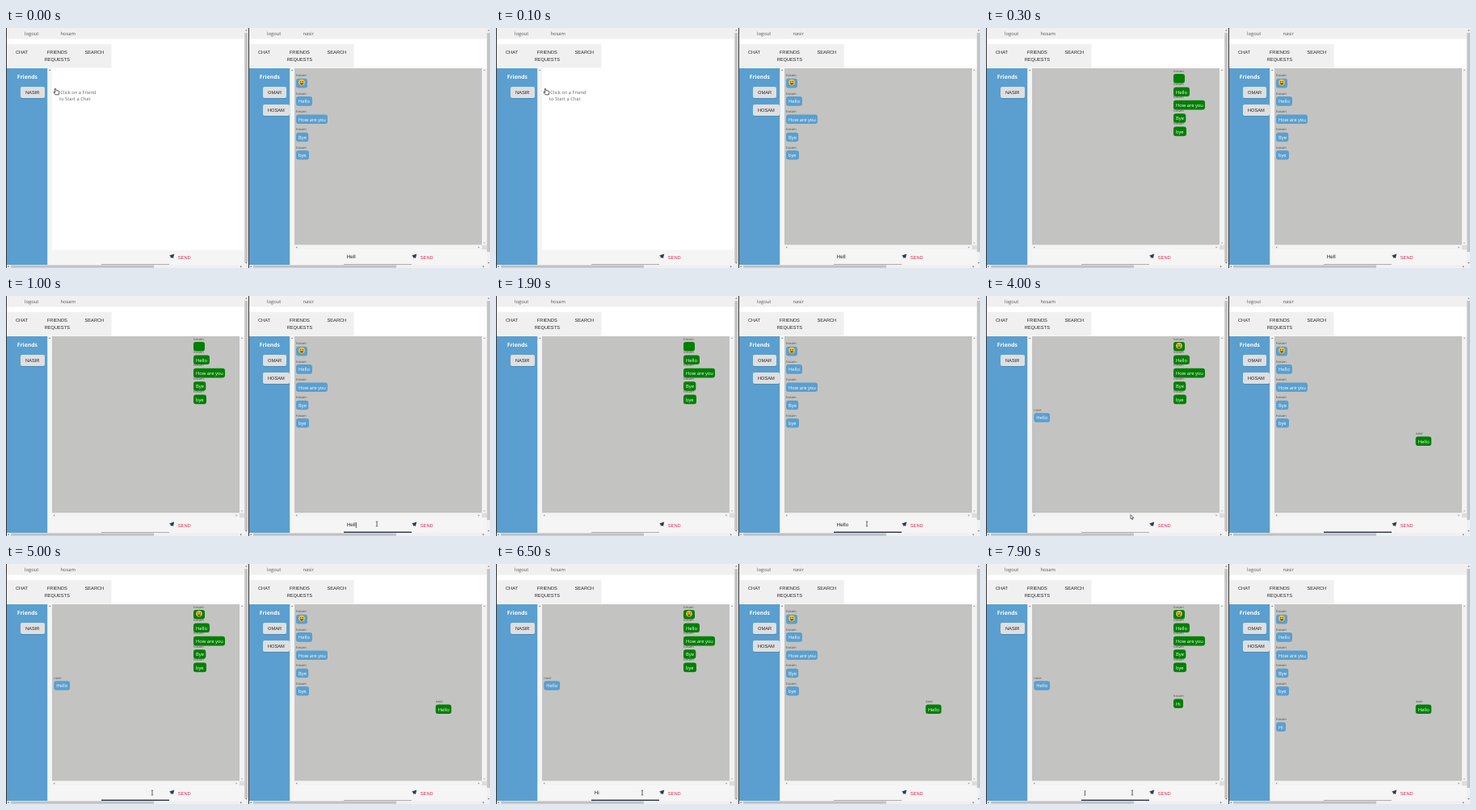
These frames come from a looping animation (599x298 px, 8000 ms). An HTML page:

```html
<!DOCTYPE html>
<html lang="en">
<head>
<meta charset="utf-8">
<title>Two chat windows</title>
<style>
html, body { margin: 0; width: 100%; height: 100%; overflow: hidden; background: #fff; }
svg { display: block; width: 599px; height: 298px; }
text { text-rendering: geometricPrecision; white-space: pre; }
.soft { font-family: "Open Sans", "Noto Sans", sans-serif; font-size: 5.8px; }
.caps { font-family: "Liberation Sans", Arial, sans-serif; font-size: 5.7px; }
</style>
</head>
<body>
<svg id="stage" viewBox="0 0 599 298" xmlns="http://www.w3.org/2000/svg"></svg>
<script>
const LOOP = 8000;
const NS = "http://www.w3.org/2000/svg";
const BLUE = "#5a9fcf", GREEN = "#007f00", GREY = "#c3c4c1", PALE = "#f0f0f0", INK = "#263247";
const stage = document.getElementById("stage");

function add(parent, tag, attrs, content) {
  const node = document.createElementNS(NS, tag);
  for (const key in attrs) node.setAttribute(key, attrs[key]);
  if (content !== undefined) node.textContent = content;
  parent.appendChild(node);
  return node;
}
const group = (parent, attrs = {}) => add(parent, "g", attrs);
const box = (parent, x, y, width, height, fill, rx = 0) =>
  add(parent, "rect", { x, y, width, height, fill, rx });
const path = (parent, d, fill, extra = {}) => add(parent, "path", { d, fill, ...extra });
const soft = (parent, x, y, str, fill, extra = {}) =>
  add(parent, "text", { x, y, fill, class: "soft", ...extra }, str);
const caps = (parent, x, y, str, fill = "#222", extra = {}) =>
  add(parent, "text", { x, y, fill, class: "caps", ...extra }, str);
const show = (node, on) => node.setAttribute("visibility", on ? "inherit" : "hidden");

function button(parent, y, label, width) {
  box(parent, 18, y + 1, width, 14, "#35699065", 2);
  box(parent, 18, y, width, 14, "#dfdfdf", 2);
  caps(parent, 24, y + 9.2, label);
}

function smiley(parent, x, y) {
  const g = group(parent, { transform: `translate(${x} ${y})` });
  add(g, "circle", { r: 3.8, fill: "#f5c33b" });
  add(g, "ellipse", { cx: -1.3, cy: -1, rx: 0.6, ry: 0.95, fill: "#50381c" });
  add(g, "ellipse", { cx: 1.3, cy: -1, rx: 0.6, ry: 0.95, fill: "#50381c" });
  path(g, "M-2.3 .7Q0 1.3 2.3 .7Q1.8 3 0 3Q-1.8 3-2.3 .7Z", "#6b3c1c");
  return g;
}

// A message: sender above a rounded bubble whose top is y.
function message(parent, x, y, who, str, width, color) {
  const g = group(parent);
  soft(g, x, y - 2.4, who, "#4a4a4a", { style: "font-size:4px" });
  box(g, x, y, width, 11.6, color, 3);
  soft(g, x + 3, y + 8.1, str, "#fff");
  return g;
}

const HISTORY = [["", 14], ["Hello", 20], ["How are you", 39], ["Bye", 15.3], ["bye", 16]];

function thread(parent, x, y, step, color) {
  HISTORY.forEach(([str, width], i) => message(parent, x, y + i * step, "hosam", str, width, color));
}

function chatArea(parent) {
  const g = group(parent);
  box(g, 57, 50, 232, 219.5, GREY);
  box(g, 57, 269.5, 232, 6, "#f3f3f3");
  box(g, 289, 50, 6, 219.5, "#f3f3f3");
  box(g, 289, 269.5, 6, 6, "#dcdcdc");
  path(g, "M60.2 271.2v2.4l-1.4-1.2zM284.6 271.2v2.4l1.4-1.2z", "#777");
  path(g, "M290.8 53h2.4l-1.2-1.4zM290.8 266.4h2.4l-1.2 1.4z", "#999");
  return g;
}

function windowPane(x, user, friends, thumb) {
  const g = group(stage, { transform: `translate(${x} 0)` });
  box(g, 0, 0, 300, 298, "#fff");
  box(g, 0, 0, 295, 13.5, PALE);
  soft(g, 23, 9.4, "logout", "#555");
  soft(g, 67.5, 9.4, user, "#555");
  box(g, 1, 20, 129.5, 29.5, PALE);
  caps(g, 12, 32, "CHAT");
  caps(g, 63.3, 32, "FRIENDS", "#222", { "text-anchor": "middle" });
  caps(g, 63.3, 41.2, "REQUESTS", "#222", { "text-anchor": "middle" });
  caps(g, 97.5, 32, "SEARCH");

  const chat = group(g);
  box(g, 1, 50, 50.5, 244, BLUE);
  soft(g, 13.8, 63, "Friends", "#fff", { style: "font-size:6.8px;font-weight:700" });
  friends.forEach(([label, width], i) => button(g, 73 + i * 22, label, width));
  box(g, 51.5, 50, 5.5, 244, "#f4f4f4");
  path(g, "M53 53h2.4l-1.2-1.4z", "#777");

  box(g, 57, 275.5, 238, 18.5, "#f5f5f5");
  const text = caps(g, 121.8, 286.4, "", "#222", { style: "font-size:6.3px" });
  const caret = box(g, 122, 281, 0.7, 7, "#222");
  box(g, 118, 293, 84, 0.8, "#9b9b9b");
  const line = box(g, 118, 292.6, 84, 1.5, INK);
  path(g, "M202.2 282.6l6-2.2-1.3 5.6-1.9-1.2-1 1.4-.2-2.2z", "#2c3a4c");
  caps(g, 212.8, 287, "SEND", "#e0284f");

  box(g, 295, 0, 5, 298, PALE);
  box(g, 295.3, 6, 4, thumb, "#c4c4c4");
  path(g, "M296 3.6h2.6l-1.3-1.6zM296 291h2.6l-1.3 1.6z", "#777");
  box(g, 0, 294, 295, 4, PALE);
  box(g, 6, 294.5, 177, 3.2, "#c1c1c1");
  path(g, "M3.6 295v2.4l-1.5-1.2zM290.2 295v2.4l1.5-1.2z", "#666");
  box(g, 0, 0, 0.9, 298, "#222");
  return { chat, text, caret, line };
}

const left = windowPane(0, "hosam", [["NASIR", 30]], 285);
const right = windowPane(300, "nasir", [["OMAR", 29], ["HOSAM", 33]], 272);

const hint = group(left.chat);
soft(hint, 67.3, 82, "Click on a Friend", "#666");
soft(hint, 66, 90.3, "to Start a Chat", "#666");

const leftChat = chatArea(left.chat);
thread(leftChat, 232, 57, 16.4, GREEN);
const lateSmiley = smiley(leftChat, 239, 61.8);
const leftHello = message(leftChat, 59.3, 145.2, "nasir", "Hello", 19.8, BLUE);
const leftHi = message(leftChat, 232, 167.5, "hosam", "Hi", 12, GREEN);

const rightChat = chatArea(right.chat);
thread(rightChat, 59, 62.8, 22.3, BLUE);
smiley(rightChat, 66, 67.6);
const rightHello = message(rightChat, 231.7, 174.5, "nasir", "Hello", 19.5, GREEN);
const rightHi = message(rightChat, 59, 196.5, "hosam", "Hi", 12, BLUE);

const outline = { stroke: "#111", "stroke-width": 0.7, "stroke-linejoin": "round" };
const pointers = {
  hand: path(stage, "M-1.6-3.5q.9-.8 1.4.2l.4 2 2.7.3q1.2.3 1 1.6l-.6 3.2h-4.2l-2-2.6q-.5-1.2.8-.8l1 .8z", "#fff", outline),
  arrow: path(stage, "M0 0v5.2l1.2-1 .9 1.9.9-.4-.9-1.9h1.6z", "#fff", { ...outline, "stroke-width": 0.6 }),
  beam: path(stage, "M-1.2-2.8h.8l.4.3.4-.3h.8M0-2.5v5M-1.2 2.8h.8l.4-.3.4.3h.8", "none",
    { stroke: "#222", "stroke-width": 0.7 })
};

const clamp = v => Math.max(0, Math.min(1, v));
const ease = v => v * v * (3 - 2 * v);
const within = (t, spans) => spans.some(([a, b]) => t >= a && t < b);

// Pointer stops: time, x, y
const ROUTE = [[400, 62, 79], [800, 459, 283], [3000, 459, 283], [3900, 179, 271.5], [4100, 179, 271.5], [4500, 181, 284]];

function pointerAt(t) {
  let i = ROUTE.length - 1;
  while (i > 0 && t < ROUTE[i][0]) i--;
  const [t0, x0, y0] = ROUTE[i];
  const [t1, x1, y1] = ROUTE[i + 1] || [t0 + 1, x0, y0];
  const k = ease(clamp((t - t0) / (t1 - t0)));
  return [x0 + (x1 - x0) * k, y0 + (y1 - y0) * k];
}

function movePointer(t) {
  const [x, y] = pointerAt(t);
  const overField = y > 277 && ((x > 118 && x < 202) || (x > 418 && x < 502));
  const kind = t < 300 ? "hand" : t < 400 ? "" : overField ? "beam" : "arrow";
  for (const name in pointers) {
    show(pointers[name], name === kind);
    pointers[name].setAttribute("transform", `translate(${x} ${y})`);
  }
}

function setField(pane, str, caretOn, width, growth) {
  pane.text.textContent = str;
  show(pane.caret, caretOn);
  pane.caret.setAttribute("x", 122 + width);
  pane.line.setAttribute("x", 160 - 42 * growth);
  pane.line.setAttribute("width", 84 * growth);
}

function render(t) {
  const opened = t >= 300, sent = t >= 2600, replied = t >= 7200;
  show(hint, !opened);
  show(leftChat, opened);
  [lateSmiley, leftHello, rightHello].forEach(n => show(n, opened && sent));
  [leftHi, rightHi].forEach(n => show(n, replied));

  const rightText = t < 1200 ? "Hell" : sent ? "" : "Hello";
  const rightWidth = [0, 0, 0, 0, 10.9, 14.4][rightText.length];
  const rightCaret = within(t, [[800, 1900], [2400, 2600], [3100, 3600]]);
  const rightGrow = t < 4500 ? ease(clamp((t - 800) / 200)) : 0;
  setField(right, rightText, rightCaret, rightWidth, rightGrow);

  const leftText = t < 5800 || replied ? "" : t < 6000 ? "H" : "Hi";
  const leftWidth = [0, 4.5, 5.9][leftText.length];
  const leftCaret = within(t, [[4500, 5000], [5500, 6500], [6900, LOOP]]);
  setField(left, leftText, leftCaret, leftWidth, ease(clamp((t - 4500) / 300)));
  left.line.setAttribute("x", 160 - 42 * ease(clamp((t - 4500) / 300)));

  movePointer(t);
}

const start = performance.now();
function tick(now) {
  render(Math.max(0, now - start) % LOOP);
  requestAnimationFrame(tick);
}
render(0);
requestAnimationFrame(tick);
</script>
</body>
</html>
```
